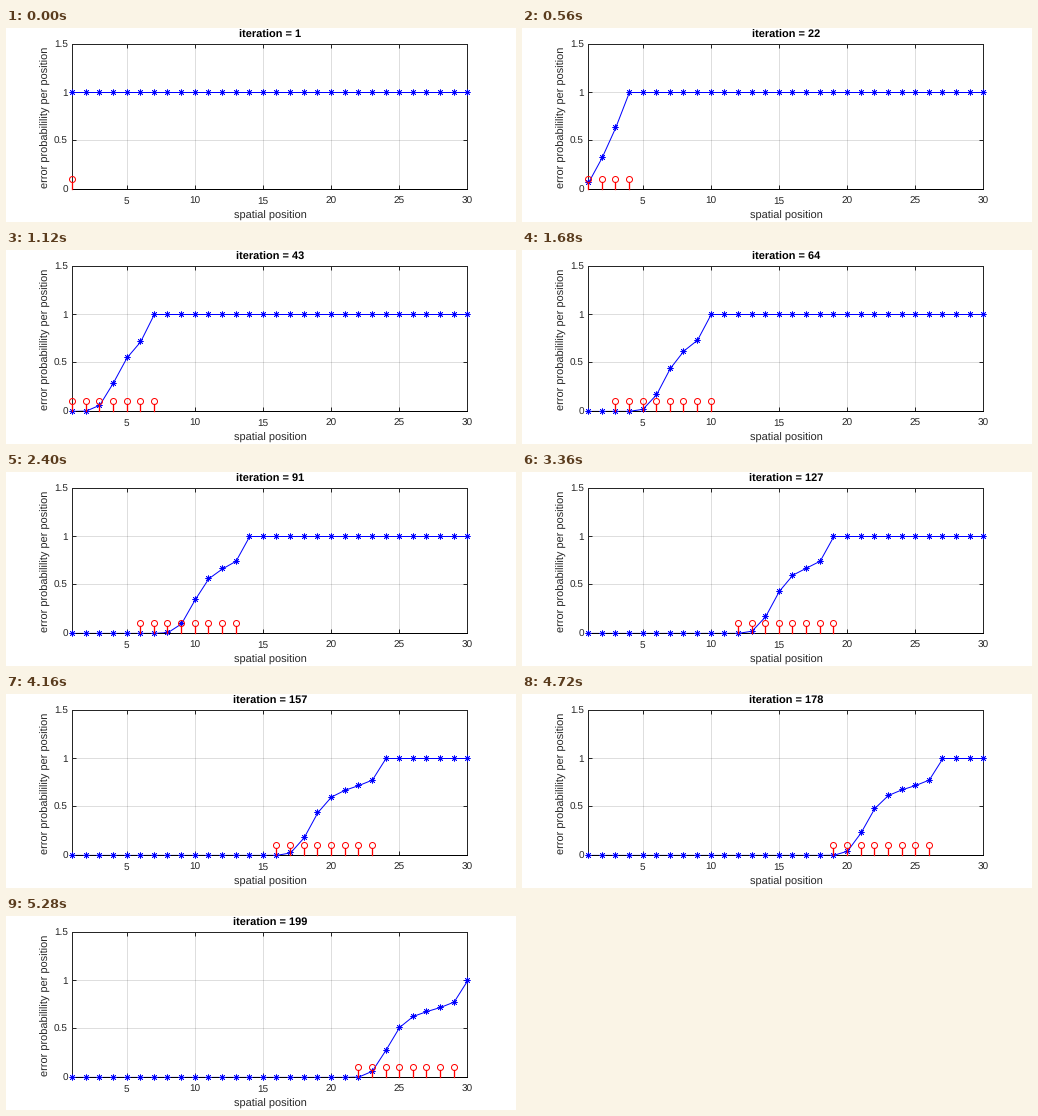
A matplotlib script that plays this animation: 510x194 px, repeating every 5.36 s.

```python
import numpy as np
import matplotlib.pyplot as plt
from matplotlib.animation import FuncAnimation
from matplotlib.transforms import ScaledTranslation

W, H, DPI = 510, 194, 64
PX = 72 / DPI                       # one pixel in points
LEFT, RIGHT, TOP, BOTTOM = 66.0, 461.3, 15.55, 160.9
INK = (0.15, 0.15, 0.15)

POSITIONS = 30
WINDOW = 8                          # positions decoded together
SHIFT = 7                           # iterations per window shift
STRIDE = 3                          # iterations per drawn step
FRAMES = 67
LOAD = 3 * 0.845                    # replicas per user times channel load
STEM = 0.1

plt.rcParams["font.family"] = "Liberation Sans"
plt.rcParams["text.hinting"] = "none"


def window(n):
    """First and last active position at iteration n."""
    last = (n - 1) // SHIFT + 1
    return max(last - WINDOW + 1, 1), last


def evolve(p, n):
    """One density evolution update inside the window."""
    first, last = window(n)
    q = np.concatenate(([0], p, [1]))
    clear = np.exp(-LOAD * (q[:-1] + q[1:]) / 2)
    new = (1 - (clear[:-1] + clear[1:]) / 2) ** 2
    out = p.copy()
    out[first - 1:last] = new[first - 1:last]
    return out


history = [np.ones(POSITIONS)]
for n in range(1, STRIDE * FRAMES):
    history.append(evolve(history[-1], n))

fig = plt.figure(figsize=(W / DPI, H / DPI), dpi=DPI, facecolor="white")
ax = fig.add_axes([LEFT / W, 1 - BOTTOM / H, (RIGHT - LEFT) / W, (BOTTOM - TOP) / H])
ax.set(xlim=(1, POSITIONS), ylim=(0, 1.5),
       xticks=range(5, 31, 5), yticks=[0, 0.5, 1, 1.5])
ax.set_yticklabels(["0", "0.5", "1", "1.5"])
ax.set_axisbelow(True)
ax.grid(color=INK, alpha=0.15, lw=PX)
ax.tick_params(direction="in", top=True, right=True, length=4 * PX, width=PX,
               color=INK, labelcolor=INK, labelsize=10 * PX)
ax.tick_params(axis="x", pad=7.5 * PX)
ax.tick_params(axis="y", pad=4 * PX)
for spine in ax.spines.values():
    spine.set(color=INK, linewidth=PX)


def label(x, y, text, **style):
    return fig.text(x / W, 1 - y / H, text, ha="center", va="baseline",
                    fontsize=11 * PX, **style)


title = label(264, 10, "", weight="bold", color="black")
label(264, 191, "spatial position", color=INK)
label(42.5, 89, "error probabilility per position", rotation=90,
      rotation_mode="anchor", color=INK)


def plot(*args, **style):
    return ax.plot(*args, clip_on=False, **style)[0]


# Free lines run through pixel centres, like the snapped markers
half = ScaledTranslation(0.5 / DPI, -0.5 / DPI, fig.dpi_scale_trans)
x = np.arange(1, POSITIONS + 1)
curve = plot(x, history[0], color="blue", lw=PX, zorder=3, snap=False,
             transform=ax.transData + half)
plot([1, POSITIONS], [0, 0], color="black", lw=PX, zorder=3.2)
stars = plot(x, history[0], ls="", marker=(8, 2, 0), color="blue", ms=6 * PX,
             mew=0.75 * PX, zorder=3.5)
stems = plot([], [], color="red", lw=1.3 * PX, zorder=4)
heads = plot([], [], "o", mec="red", mfc="none", ms=6 * PX, mew=PX, zorder=4)
stem_top = STEM - 3 * 1.5 / (BOTTOM - TOP)


def draw(k):
    n = 1 + STRIDE * k
    first, last = window(n)
    active = np.arange(first, last + 1)
    curve.set_ydata(history[n - 1])
    stars.set_ydata(history[n - 1])
    stems.set_data(np.repeat(active, 3), np.tile([0, stem_top, np.nan], active.size))
    heads.set_data(active, np.full(active.size, STEM))
    title.set_text(f"iteration = {n}")
    return curve, stars, stems, heads, title


anim = FuncAnimation(fig, draw, frames=FRAMES, interval=1000 * 0.08, repeat=True, blit=False)
plt.show()
```
